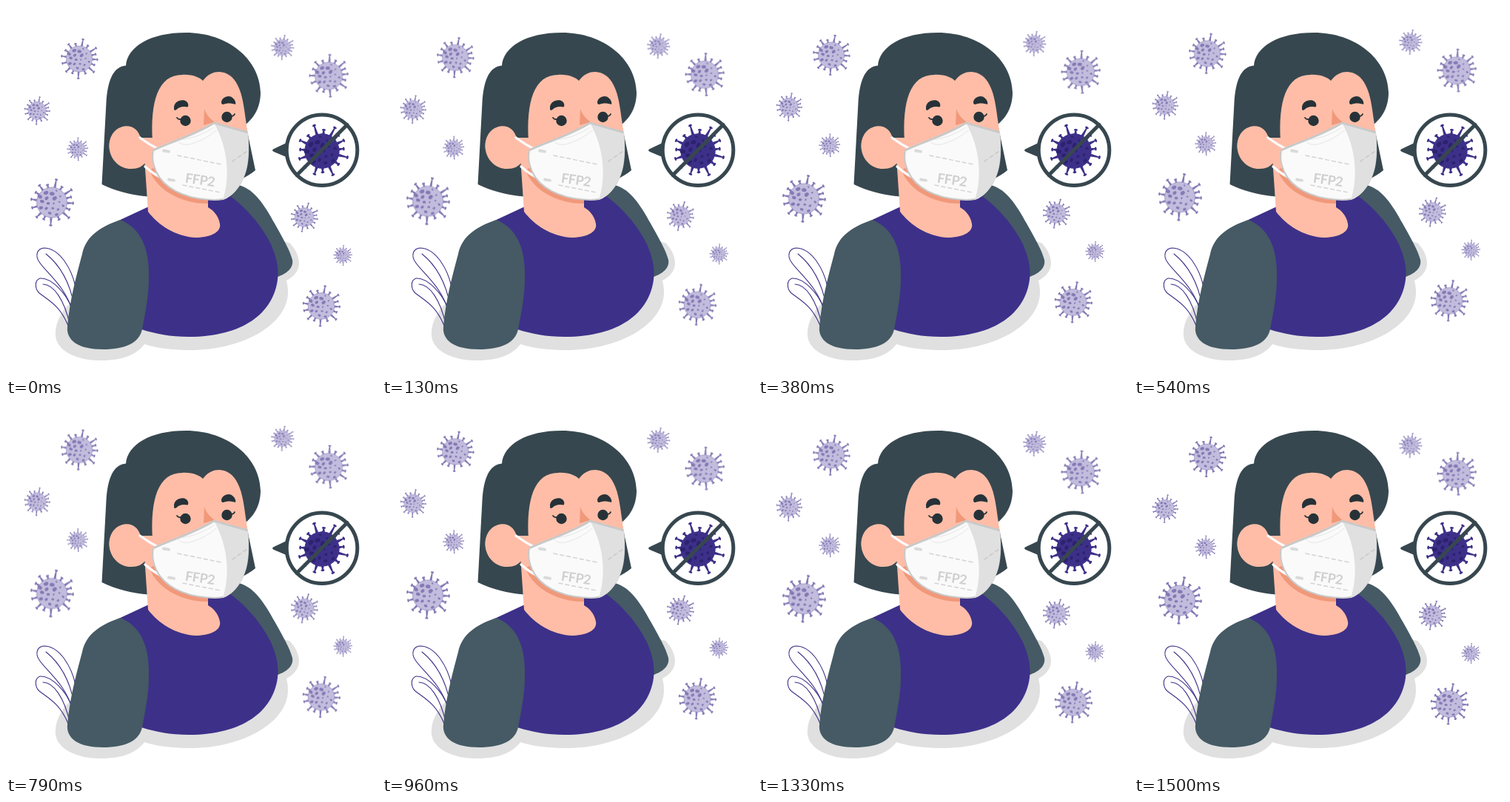
An HTML page for the animation above (1.54 s loop, 500x500 px).

```html
<!DOCTYPE html>
<html lang="en">
<head>
<meta charset="utf-8">
<title>Wear a mask</title>
<style>
  html, body { margin: 0; width: 100%; height: 100%; overflow: hidden; background: #fff; }
  svg { display: block; width: 100%; height: 100%; }
  .skin { fill: #ffbda7; }
  .shade { fill: #f0997a; }
  .hair { fill: #37474f; }
  .sleeve { fill: #455a64; }
  .top { fill: #3d3089; }
  .ink { fill: #263238; }
  .line { fill: none; stroke-linecap: round; stroke-linejoin: round; }
  .label { font: 700 18px Lato, sans-serif; letter-spacing: -.5px; fill: #cfcfcf; }
</style>
</head>
<body>
<svg viewBox="0 0 500 500">
  <!-- ground shadow -->
  <path fill="#e0e0e0" d="M83 405C70 420 66 434 67 446C69 466 95 479 128 479C160 479 177 470 187 457C205 463 228 465 250 465C320 465 381 430 381 387Q381 378 379 371C389 366 396 357 396 348C396 337 390 327 383 320L300 300Z"/>

  <!-- leaves -->
  <g class="line" stroke="#3d3089" stroke-width="1.1">
    <path d="M94 380C89 356 73 327 51 327C42 328 39 337 45 346C54 360 82 380 90 414"/>
    <path d="M54 335C69 347 85 368 92 404"/>
    <path d="M89 409C82 389 62 367 46 368C38 371 39 382 45 388C58 398 73 405 84 432"/>
    <path d="M50 376C64 376 79 397 86 430"/>
  </g>

  <!-- hair -->
  <path class="hair" d="M129.500 241L135.500 130C137.500 100 145 82 162 80.500C164 55 195 36 243 36C300 36 343 72 344 117C344 138 334 152 324 160L337 222C325 232 312 237 300 239L193 257.500C170 256 148 250 129.500 241Z"/>

  <!-- body -->
  <path class="sleeve" d="M300 241C326 239 341 257 355 280C370 306 384 330 387 343C389 355 378 362 367 366L330 300L290 252Z"/>
  <path class="top" d="M150 291L193 271L273 250L296 252C319 267 343 292 358 322C365 338 369 354 367 370C361 415 320 447 247 447C222 447 202 443 183 437Z"/>
  <path class="sleeve" d="M155 289C130 297 108 310 103 335C93 372 86 400 83 433C81 452 98 464 131 464C162 464 180 455 184 437C188 416 193 392 193 368C194 332 185 302 155 289Z"/>

  <!-- neck, ear, face -->
  <path class="skin" d="M187 205L192 278C205 295 228 312 258 313C280 312 291 304 289 294C287 283 280 276 273 272V235Z"/>
  <path class="shade" d="M194 222C204 250 240 268 273 267V250L205 215Z"/>
  <path class="skin" d="M182 178C178 166 170 161 160 162.500C145 165 138.500 179 139.500 192C141.500 210 156 221 170 220C178 220 184 217 188 212L204 222L200 178Z"/>
  <path class="skin" d="M198 182C195 130 205 93 238 93C252 92 262 97 266 101C273 92 280 89 288 89C312 90 319 118 322 140L327 175L316 230L210 225L190 208L188 182Z"/>
  <path class="shade" d="M268 139C271 148 276 152 282 157L267 161Z"/>

  <!-- eyes and brows -->
  <g class="ink">
    <circle cx="242.5" cy="155" r="7.2"/>
    <circle cx="298.5" cy="150" r="7.2"/>
    <path d="M227 138C226.500 130 235 126 241 127.500C246 129 247.500 134 245.500 136.500C239 135 234 136.500 231 139.500C228 142 227 141 227 138Z"/>
    <path d="M291 130.500C291 124.500 298 120.500 304 122.500C309 125.500 311 130 310 133C304 131 298 131 294 133Q291 133 291 130.500Z"/>
  </g>
  <path class="line" stroke="#263238" stroke-width="1.8" d="M238 153Q233 154 231 151M303 149Q308 149 309 146"/>

  <!-- mask -->
  <path class="line" stroke="#fafafa" stroke-width="3.4" d="M181 178Q193 187 207 194M188 217Q200 228 214 234"/>
  <path fill="#fafafa" stroke="#c9c9c9" stroke-width="2" d="M199 195C222 184 256 174 281 158L326 170C328 190 328 212 322 228C316 245 305 257 293 261C285 262.500 278 262 272 261.500C240 259 213 246 203 224C198 213 197 204 199 195Z"/>
  <path fill="#e0e0e0" d="M281 158L326.500 170C328.500 190 328.500 212 322.500 228C316 246 305 258 293 262C302 235 302 195 281 158Z"/>
  <path class="line" stroke="#c9c9c9" stroke-width="2.8" d="M201 194C222 184 256 174 281 158L325 170.500"/>
  <path class="line" stroke="#e6e6e6" stroke-width="1" d="M232 182Q236 189 248 187Q270 181 284 168M236 181Q260 178 281 164"/>
  <g fill="#dadada">
    <rect x="211" y="194" width="11" height="4" rx="2" transform="rotate(9 216 196)"/>
    <rect x="218" y="233" width="11" height="4" rx="2" transform="rotate(9 223 235)"/>
  </g>
  <path class="line" stroke="#d3d3d3" stroke-width="1.5" stroke-dasharray="5 4" d="M232 202L291 214M239 242L290 252"/>
  <path class="line" stroke="#c9c9c9" stroke-width="1.5" stroke-dasharray="5 4" d="M306 210L326 196"/>
  <text class="label" transform="translate(241.5 238.5) rotate(8)">FFP2</text>

  <!-- sign -->
  <path class="hair" d="M362 193L381 184V205L362 197Q358 195 362 193Z"/>
  <circle cx="427" cy="194.700" r="47.800" fill="#fff"/>
  <g id="sign"></g>
  <g class="line" stroke="#37474f" stroke-width="5">
    <circle cx="427" cy="194.700" r="47.800"/>
    <path d="M393 228.500L461 160.500"/>
  </g>

  <g id="drift"></g>
</svg>
<script>
  const NS = 'http://www.w3.org/2000/svg';
  const PALE = { body: '#c2bcdd', rim: '#a198ca', spot: '#857ab5', spike: '#857ab5' };
  const DARK = { body: '#3d3089', rim: '#3d3089', spot: '#2c226f', spike: '#3d3089' };

  // Spikes: clockwise angle from the top, reach for a body of radius 18
  const SPIKES = [[11, 28], [33, 22.5], [57, 28], [74, 24], [92, 25.5], [112, 23], [132, 27.5],
    [157, 22.5], [183, 27.5], [206, 22.5], [226, 25.5], [255, 24.5], [279, 25], [302, 23], [324, 25.5], [346, 22]];

  const add = (parent, tag, attrs) => {
    const el = document.createElementNS(NS, tag);
    for (const key in attrs) el.setAttribute(key, attrs[key]);
    return parent.appendChild(el);
  };

  function virus(parent, x, y, r, turn, look, stretch = 1) {
    const g = add(parent, 'g', {
      transform: `translate(${x} ${y}) rotate(${turn}) scale(${r / 18})`
    });
    for (const [angle, reach] of SPIKES) {
      const tip = reach * stretch;
      const arm = add(g, 'g', { transform: `rotate(${angle})`, fill: look.spike });
      add(arm, 'path', { d: `M-1.500 -17L-.600 ${-tip + 1}H.600L1.500 -17Z` });
      add(arm, 'ellipse', { cy: -tip + 1, rx: 1.9, ry: 1.1 });
    }
    add(g, 'circle', { r: 17.5, fill: look.body, stroke: look.rim, 'stroke-width': 0.8 });
    const count = 18;
    for (let i = 0; i < count; i++) {
      const d = 15.8 * Math.sqrt((i + 0.4) / count), a = i * 2.4 + 0.5;
      const size = 1 + (i * 7 % 5) * 0.32;
      const cx = d * Math.cos(a), cy = d * Math.sin(a);
      add(g, 'ellipse', {
        cx, cy, rx: size * 1.25, ry: size * 0.9, fill: look.spot,
        transform: `rotate(${i * 47 % 90 - 45} ${cx} ${cy})`
      });
    }
  }

  const drift = document.getElementById('drift');
  [[99, 71.5, 18, 0], [436, 94.5, 19, -8], [42, 141.5, 12.5, 0],
   [96.5, 193.5, 10.2, -8], [62, 265.5, 21, 0], [373.5, 56, 11, 0],
   [403, 285.5, 13.2, 6], [455, 337, 9, -6], [426, 405.5, 18.3, 0]
  ].forEach(v => virus(drift, ...v, PALE));
  virus(document.getElementById('sign'), 427, 196, 23.8, -28, DARK, 1.01);

  // Steady rise and fall, with a short rest at the bottom
  const LOOP = 1540, RISE = 750;
  drift.animate([
    { transform: 'translateY(0px)', offset: 0 },
    { transform: 'translateY(-10px)', offset: RISE / LOOP },
    { transform: 'translateY(0px)', offset: 2 * RISE / LOOP },
    { transform: 'translateY(0px)', offset: 1 }
  ], { duration: LOOP, iterations: Infinity });
</script>
</body>
</html>
```
